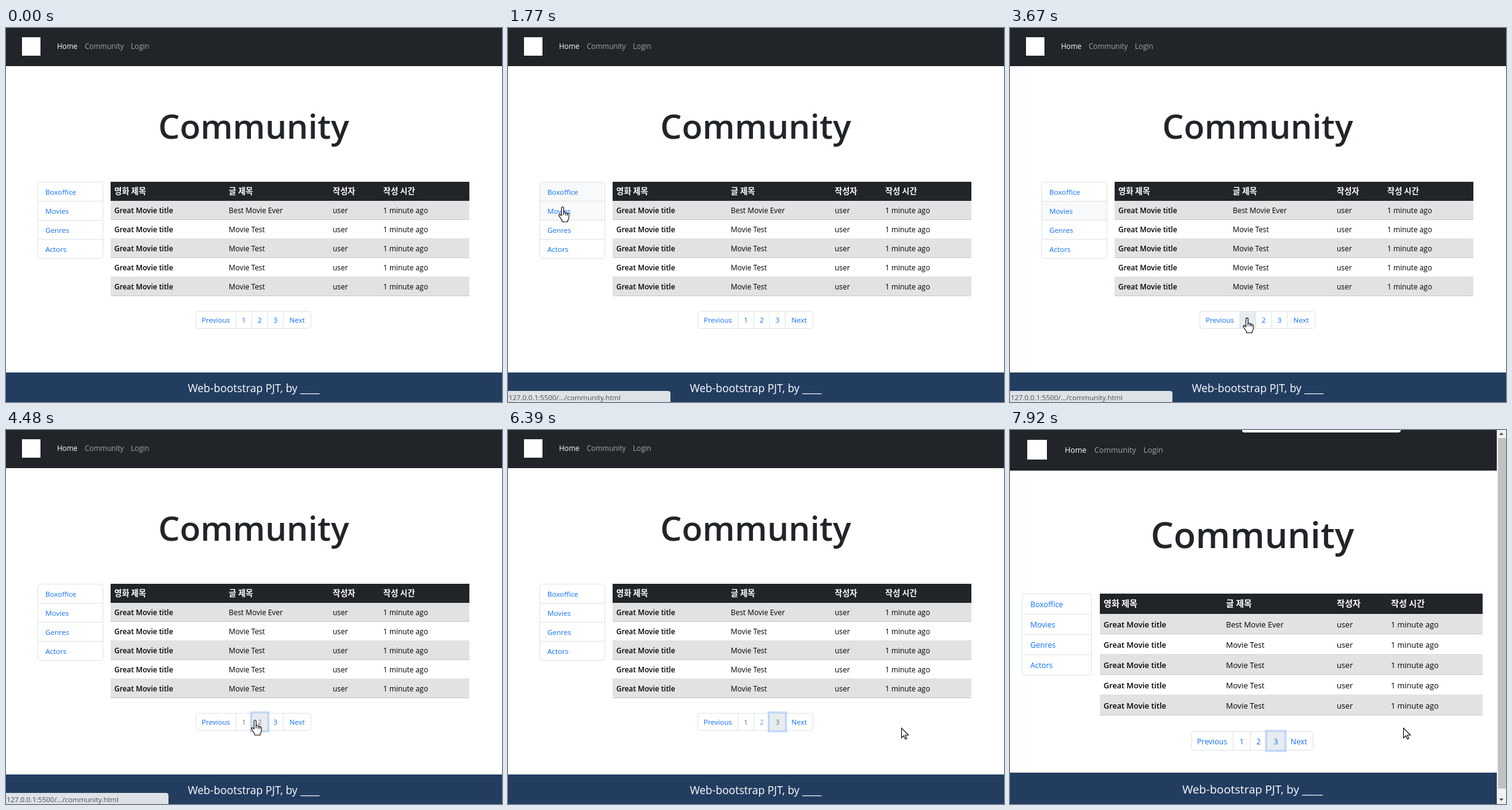
An HTML page with a canvas for the animation above (8 s loop, 806 by 608 pixels).

```html
<!DOCTYPE html>
<html lang="ko">
<head>
<meta charset="utf-8">
<title>Community</title>
<style>
html, body { margin: 0; width: 100%; height: 100%; overflow: hidden; background: #fff; }
canvas { display: block; }
</style>
</head>
<body>
<canvas id="stage" width="806" height="608"></canvas>
<script>
const ctx = document.getElementById('stage').getContext('2d');
const LOOP = 8000, ZOOM_AT = 7730;
const DARK = '#212529', LINK = '#0d6efd', LINE = '#dee2e6', MUTED = '#6c757d', HOVER = '#e9ecef';
const SANS = '"Open Sans", "Noto Sans", "Noto Sans CJK KR", "Noto Sans CJK", sans-serif';
const KOREAN = '"Noto Sans CJK KR", "Noto Sans CJK", sans-serif';

// The page before and after the browser zoom.
const SMALL = {
  zoom: 1, width: 806, nav: 62, logo: [26, 15, 30], navX: [83, 128, 203], navY: 34,
  mid: 402.5, titleY: 180, top: 250, row: 31, list: [51.5, 157.5], listX: 64,
  table: [170, 753], cols: [176, 362, 531, 613],
  pages: [308.5, 373.5, 399.5, 425, 450.5, 495.5], pageTop: 460.5, pageH: 28, pageY: 479,
  footer: 560, footerY: 592
};
const LARGE = {
  zoom: 1.066, width: 791, nav: 66, logo: [28, 16, 32], navX: [89, 137, 217], navY: 37,
  mid: 394, titleY: 192, top: 266, row: 33, list: [19.5, 132.5], listX: 33,
  table: [146, 768], cols: [152, 351, 531, 619],
  pages: [294.5, 362.5, 390.5, 417.5, 446.5, 492.5], pageTop: 490.5, pageH: 30, pageY: 511,
  footer: 557, footerY: 591
};

// Pointer stops: time, x, y.
const STOPS = [
  [260, 687, 596], [1020, 90, 268], [1560, 90, 268], [1770, 89, 291], [2390, 89, 291],
  [2930, 375, 461], [3140, 383, 470], [3900, 386, 472], [4250, 405, 472], [5030, 405, 472],
  [5400, 437, 469], [5700, 437, 469], [5780, 450, 462], [5890, 530, 446], [6050, 628, 482],
  [6190, 628, 482], [6260, 639, 484]
];
const HAND = new Path2D('M-2 14V1.5a1.7 1.7 0 0 1 3.4 0V8.5q1.8-.9 3.2 1q1.8-.7 2.8 1q2.6-.5 2.6 2V17q0 3-2 5V24H-1V22L-6 14.5q-.8-2.2 1-2.4q1.3 0 3 1.9z');
const FINGERS = new Path2D('M1.4 8.5V13M4.6 9.5V13.5M7.4 10.5V14');
const ARROW = new Path2D('M.5.5V16.5L4.2 13L6.7 18.5L9 17.5L6.6 12H11.7z');

const HOST = '127.0.0.1:5500/';
const SHORT_URL = HOST + '.../community.html';
const LONG_URL = HOST + 'Web_Front_end/library/Bootstrap/practice/project_01/community.html#';
// Status bar visits: fade in, widen, fade out.
const VISITS = [[1160, 2480, 2720], [3200, 4500, 6190]];

const ramp = (t, from, length) => Math.min(1, Math.max(0, (t - from) / length));
const mix = (a, b, k) => a + (b - a) * k;
const passed = (t, ...times) => times.filter(x => t >= x).length - 1;

function rect(x, y, w, h, color) {
  ctx.fillStyle = color;
  ctx.fillRect(x, y, w, h);
}

function rounded(x, y, w, h, radius, fill, stroke) {
  ctx.beginPath();
  ctx.roundRect(x, y, w, h, radius);
  if (fill) { ctx.fillStyle = fill; ctx.fill(); }
  if (stroke) { ctx.strokeStyle = stroke; ctx.lineWidth = 1; ctx.stroke(); }
}

function text(str, x, y, size, color, { weight = 400, align = 'left', family = SANS } = {}) {
  ctx.font = `${weight} ${size}px ${family}`;
  ctx.textAlign = align;
  ctx.fillStyle = color;
  ctx.fillText(str, x, y);
}

function drawNav(p) {
  rect(0, 0, p.width, p.nav, DARK);
  const [x, y, side] = p.logo;
  rect(x, y, side, side, '#fff');
  ['Home', 'Community', 'Login'].forEach((s, i) =>
    text(s, p.navX[i], p.navY, 11.7 * p.zoom, i ? '#a3a5a8' : '#fff'));
}

function drawList(p, t) {
  const [x, right] = p.list, w = right - x, y = p.top + .5;
  ctx.save();
  ctx.beginPath();
  ctx.roundRect(x, y, w, p.row * 4, 4);
  ctx.clip();
  [[1160, 2050], [1630, 3800]].forEach(([from, to], i) => {
    if (t >= from && t < to) rect(x, y + i * p.row, w, p.row, '#f8f9fa');
  });
  ctx.restore();
  rounded(x, y, w, p.row * 4, 4, null, LINE);
  ['Boxoffice', 'Movies', 'Genres', 'Actors'].forEach((s, i) => {
    if (i) rect(x, p.top + i * p.row, w, 1, LINE);
    text(s, p.listX, p.top + i * p.row + 20.5 * p.zoom, 11.6 * p.zoom, LINK);
  });
}

function drawTable(p) {
  const [x, right] = p.table, w = right - x, base = 20.3 * p.zoom;
  rect(x, p.top, w, p.row, DARK);
  ['영화 제목', '글 제목', '작성자', '작성 시간'].forEach((s, i) =>
    text(s, p.cols[i], p.top + base - .5, 13.2 * p.zoom, '#fff', { weight: 700, family: KOREAN }));
  for (let r = 1; r <= 5; r++) {
    const y = p.top + r * p.row;
    if (r % 2) {
      rect(x, y, w, p.row, '#e1e2e4');
      rect(x, y + p.row - 1, w, 1, '#c7c9cb');
    } else {
      rect(x, y + p.row - 1, w, 1, LINE);
    }
    ['Great Movie title', r > 1 ? 'Movie Test' : 'Best Movie Ever', 'user', '1 minute ago']
      .forEach((s, i) => text(s, p.cols[i], y + base, 11.9 * p.zoom, '#000', { weight: i ? 400 : 600 }));
  }
}

function drawPages(p, t) {
  const x = p.pages, y = p.pageTop, h = p.pageH;
  const hovered = passed(t, 3050, 4100, 5200), focused = passed(t, 3800, 4330, 5450);
  for (const i of [hovered, focused])
    if (i >= 0) rect(x[i + 1], y, x[i + 2] - x[i + 1], h, HOVER);
  rounded(x[0], y, x[5] - x[0], h, 4, null, LINE);
  for (let i = 1; i < 5; i++) rect(x[i] - .5, y, 1, h, LINE);
  if (focused >= 0) {
    const left = x[focused + 1], w = x[focused + 2] - left;
    ctx.strokeStyle = 'rgba(13,110,253,.25)';
    ctx.lineWidth = 3;
    ctx.strokeRect(left - 1.5, y - 1.5, w + 3, h + 3);
  }
  ['Previous', '1', '2', '3', 'Next'].forEach((s, i) => {
    let color = LINK;
    if (p === SMALL && i > 0 && i < 4) {
      if (i - 1 === focused) color = MUTED;
      else if (i - 1 < focused) color = i === 1 ? MUTED : '#62a8ea';
    }
    text(s, (x[i] + x[i + 1]) / 2, p.pageY, 11.6 * p.zoom, color, { align: 'center' });
  });
}

function drawStatus(t) {
  for (const [show, widen, hide] of VISITS) {
    const alpha = ramp(t, show - 60, 200) * (1 - ramp(t, hide - 20, 200));
    if (!alpha) continue;
    const w = mix(264, 477, ramp(t, widen, 200));
    ctx.save();
    ctx.globalAlpha = alpha;
    rounded(-1, 590, w + 1, 20, [0, 4, 0, 0], '#dee1e6');
    ctx.clip();
    text(t > widen ? LONG_URL : SHORT_URL, 1, 605, 11.4, '#4a4d51');
    ctx.restore();
  }
}

function drawScrollbar() {
  rect(791, 0, 15, 608, '#f1f1f1');
  rect(793, 13, 13, 570, '#c1c1c1');
  ctx.fillStyle = '#505050';
  ctx.fill(new Path2D('M795 8l3.5-4 3.5 4zM795 599l3.5 4 3.5-4z'));
}

function drawPointer(t) {
  if (t < STOPS[0][0]) return;
  let i = 0;
  while (i < STOPS.length - 1 && t >= STOPS[i + 1][0]) i++;
  const a = STOPS[i], b = STOPS[i + 1] || a;
  let k = ramp(t, a[0], b[0] - a[0] || 1);
  if (b[0] - a[0] > 150) k = k * k * (3 - 2 * k);
  const x = mix(a[1], b[1], k), y = mix(a[2], b[2], k);
  const overList = x > 51 && x < 158 && y > 250 && y < 375;
  const overPages = x > 308 && x < 496 && y > 460 && y < 489;
  const hand = overList || overPages;
  ctx.save();
  ctx.translate(x, y);
  ctx.fillStyle = '#fff';
  ctx.strokeStyle = '#000';
  ctx.lineWidth = 1.1;
  ctx.fill(hand ? HAND : ARROW);
  ctx.stroke(hand ? HAND : ARROW);
  if (hand) ctx.stroke(FINGERS);
  ctx.restore();
}

function draw(now) {
  const t = now % LOOP, p = t < ZOOM_AT ? SMALL : LARGE;
  rect(0, 0, 806, 608, '#fff');
  drawNav(p);
  text('Community', p.mid, p.titleY, 55 * p.zoom, DARK, { weight: 600, align: 'center' });
  drawList(p, t);
  drawTable(p);
  drawPages(p, t);
  rect(0, p.footer, p.width, 608 - p.footer, '#233d61');
  text('Web-bootstrap PJT, by ____', p.mid, p.footerY, 17.5 * p.zoom, '#fff', { align: 'center' });
  drawStatus(t);
  if (p === LARGE) drawScrollbar();
  if (t >= 7660) rounded(377, -6, 258, 10, 4, '#fff');
  drawPointer(t);
}

const start = performance.now();
function tick() {
  draw(performance.now() - start);
  requestAnimationFrame(tick);
}
tick();
</script>
</body>
</html>
```
